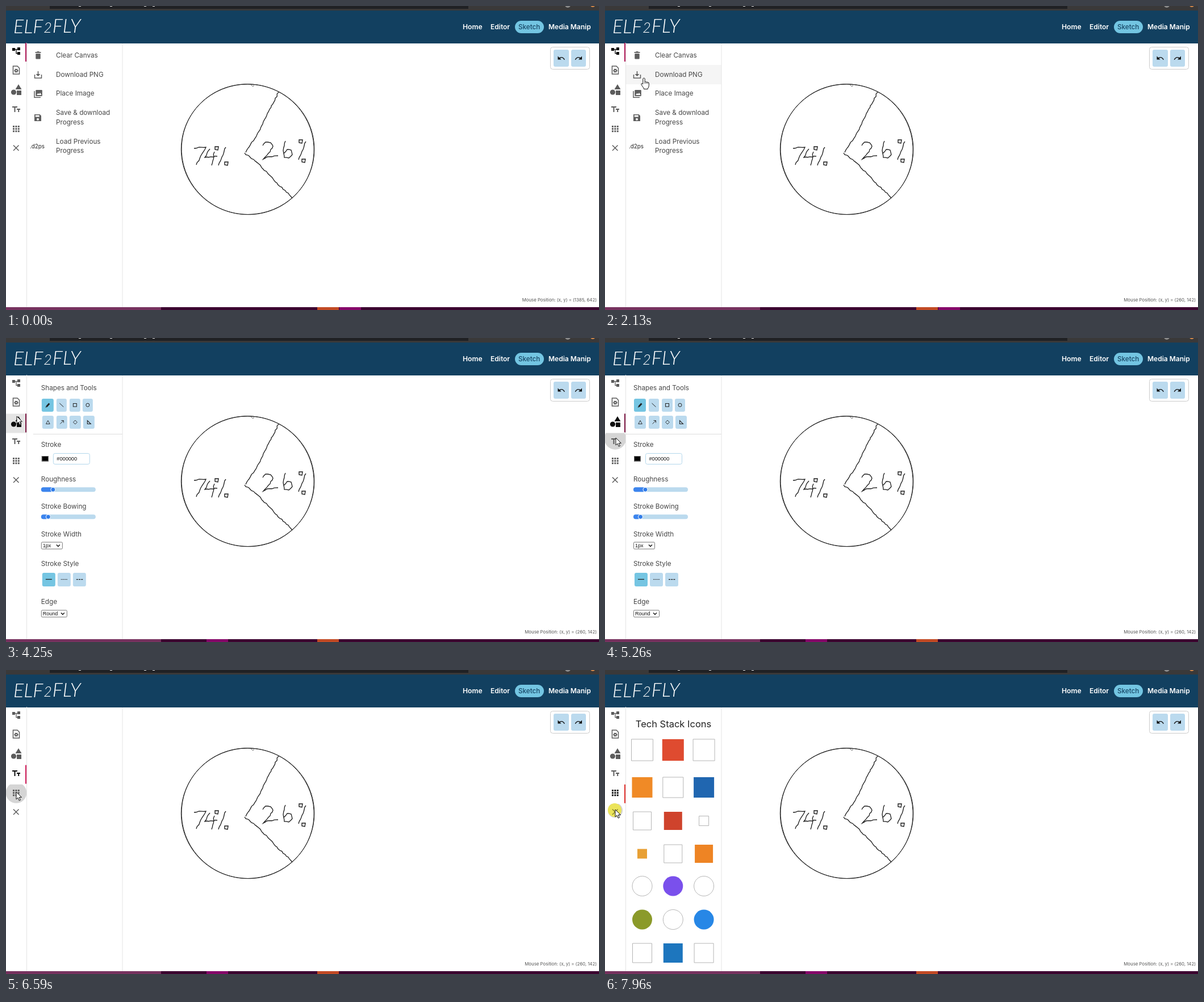
Recreate the animation shown at these times as an HTML page with a canvas. Size 1044 by 536 pixels, loop 8 s.

```html
<!DOCTYPE html>
<html lang="en">
<head>
<meta charset="utf-8">
<title>Sketch editor</title>
<style>
html, body { margin: 0; width: 100%; height: 100%; overflow: hidden; background: #fff; }
canvas { display: block; }
</style>
</head>
<body>
<canvas id="stage" width="1044" height="536"></canvas>
<script>
const ctx = document.getElementById('stage').getContext('2d');
const LOOP = 8000, RELEASE = 270, SLIDE = 460;
const UI = 'Inter, sans-serif', FORM = '"Liberation Sans", Arial, sans-serif';
const PALE = '#bbdaee', PICKED = '#75c5e2', GREY = '#5c5c5c', INK = '#1c1c1c';

// time, x, y of the pointer tip
const POINTER = [
  [70, 850, 470], [320, 562, 306], [650, 562, 306], [860, 361, 205],
  [1450, 361, 205], [1790, 54, 139], [1980, 54, 139], [2130, 69, 127],
  [2420, 17, 114], [2660, 17, 114], [3410, 20, 133], [3500, 20, 135],
  [3600, 19, 138], [4300, 19, 138], [4590, 19, 161], [4640, 19, 161],
  [4770, 19, 176], [5300, 19, 176], [5830, 18, 211], [5910, 18, 215],
  [7210, 18, 215], [7530, 18, 246], [8000, 18, 246]
];
const HAND_TIMES = [[1600, 3800], [4450, 4770], [5450, 5830], [7210, 7530]];
const CLICKS = [2660, 3800, 5040, 6380, 7810];
const MARKS = ['#b01857', '#dc1452', '#7c1743', '#cf1b58', '#e0302c'];

const clamp = v => Math.max(0, Math.min(1, v));
const easeOut = p => 1 - (1 - clamp(p)) ** 3;
const tabTop = i => 65 + 34.2 * i;

function seeded(seed) {
  return () => (seed = (seed * 16807) % 2147483647) / 2147483647;
}

function rect(x, y, w, h, color) {
  ctx.fillStyle = color;
  ctx.fillRect(x, y, w, h);
}

function box(x, y, w, h, r, fill, stroke, width = 1) {
  ctx.beginPath();
  ctx.roundRect(x, y, w, h, r);
  paint(fill, stroke, width);
}

function disc(x, y, r, fill, stroke, width = 1) {
  ctx.beginPath();
  ctx.arc(x, y, r, 0, Math.PI * 2);
  paint(fill, stroke, width);
}

function paint(fill, stroke, width) {
  if (fill) { ctx.fillStyle = fill; ctx.fill(); }
  if (stroke) { ctx.strokeStyle = stroke; ctx.lineWidth = width; ctx.stroke(); }
}

function line(points, color, width = 1, close = false) {
  ctx.beginPath();
  for (let i = 0; i < points.length; i += 2) ctx.lineTo(points[i], points[i + 1]);
  if (close) ctx.closePath();
  paint(null, color, width);
}

function shape(x, y, d, fill, stroke, width = 1) {
  ctx.save();
  ctx.translate(x, y);
  const p = new Path2D(d);
  if (fill) { ctx.fillStyle = fill; ctx.fill(p); }
  if (stroke) { ctx.strokeStyle = stroke; ctx.lineWidth = width; ctx.stroke(p); }
  ctx.restore();
}

function text(s, x, y, size = 11.7, color = '#474747', weight = 400, family = UI, align = 'left') {
  ctx.font = `${weight} ${size}px ${family}`;
  ctx.textAlign = align;
  ctx.textBaseline = 'middle';
  ctx.fillStyle = color;
  ctx.fillText(s, x, y);
}

function pointerAt(t) {
  if (t < POINTER[0][0]) return null;
  const i = POINTER.findIndex(k => k[0] > t);
  const [t0, x0, y0] = POINTER[i - 1], [t1, x1, y1] = POINTER[i];
  const p = (t - t0) / (t1 - t0);
  return { x: x0 + (x1 - x0) * p, y: y0 + (y1 - y0) * p };
}

function logo() {
  let x = 13;
  for (const [s, size, y] of [['ELF', 34, 48], ['2', 25, 47], ['FLY', 34, 47]]) {
    ctx.font = `italic 300 ${size}px Lato, sans-serif`;
    ctx.textAlign = 'left';
    ctx.textBaseline = 'alphabetic';
    ctx.fillStyle = '#fff';
    ctx.fillText(s, x, y);
    x += ctx.measureText(s).width + 1;
  }
}

function header() {
  rect(0, 0, 1044, 8, '#3a3939');
  rect(77, 0, 737, 5, '#202124');
  for (const x of [128, 183, 243, 258]) rect(x, 0, 4, 1, '#ddd');
  disc(989, -2, 5, '#8b8b8b');
  disc(1033, -2, 4, '#d98b4a');
  rect(0, 8, 1044, 58, '#124060');
  logo();
  text('Home', 804, 37, 12.2, '#fff', 600);
  text('Editor', 853, 37, 12, '#fff', 600);
  box(896, 26, 51, 22, 11, '#73c5e2');
  text('Sketch', 902, 37, 11.7, '#174766', 500);
  text('Media Manip', 955, 37, 12, '#fff', 600);
}

function history() {
  box(958.5, 72.5, 69, 39, 4, '#fff', '#ccc');
  box(964, 77, 27, 30, 3, PALE);
  box(995, 77, 26, 30, 3, PALE);
  const undo = 'M-6-4V2H0L-2.2-.2Q2.2-3 5 2.5L6.4 2Q3-5-3.4-1.4z';
  shape(977.5, 92.5, undo, '#111');
  ctx.save();
  ctx.translate(1008, 92.5);
  ctx.scale(-1, 1);
  shape(0, 0, undo, '#111');
  ctx.restore();
}

function taskbar(t) {
  rect(0, 531, 1044, 5, '#3c0330');
  rect(0, 531, 273, 5, '#77325f');
  rect(548, 531, 38, 5, '#c24a25');
  rect(t < 2750 ? 587 : 353, 531, 38, 5, '#86086a');
}

// a hand-drawn stroke: short segments pushed off the straight line
function rough(points, seed, jag = 1) {
  const rnd = seeded(seed), out = [points[0], points[1]];
  for (let i = 2; i < points.length; i += 2) {
    const [x0, y0, x1, y1] = points.slice(i - 2, i + 2);
    const n = Math.max(1, Math.round(Math.hypot(x1 - x0, y1 - y0) / 4));
    for (let k = 1; k <= n; k++) {
      const amp = k < n ? jag : 0;
      out.push(x0 + (x1 - x0) * k / n + (rnd() - .5) * 2 * amp,
               y0 + (y1 - y0) * k / n + (rnd() - .5) * 2 * amp);
    }
  }
  line(out, INK, 1.3);
}

// slash starts at x, y; a square is centred on each of the two dots
function percent(x, y, dots) {
  rough([x, y, x - 5, y + 14, x - 13, y + 32], 61, .8);
  for (const [cx, cy] of dots) {
    line([cx - 3, cy - 3, cx + 3, cy - 3, cx + 2, cy + 3, cx - 3, cy + 2], INK, 1.4, true);
  }
}

function pie() {
  for (const [rx, ry, turn] of [[117.3, 114.8, 0], [116.7, 115, .25]]) {
    ctx.beginPath();
    ctx.ellipse(425.6, 252.7, rx, ry, turn, 0, Math.PI * 2);
    paint(null, '#222', 1);
  }
  line([431, 139, 435, 142, 437, 139], '#555', .8);
  rough([480, 152, 459, 193, 440, 231, 422, 258], 17);
  rough([420, 259, 448, 281, 466, 300, 482, 318, 497, 330, 504, 339], 29);
  rough([331, 251, 340, 249, 352, 249, 343, 264, 335, 280], 7, .9);
  rough([359, 252, 350, 267, 372, 265], 11, .9);
  rough([367, 257, 362, 281], 13, .9);
  percent(387, 249, [[371, 251], [388, 278]]);
  rough([452, 246, 457, 240, 466, 241, 470, 247, 465, 257, 453, 270, 460, 266, 479, 264], 19, .7);
  rough([492, 238, 488, 255, 490, 267, 498, 268, 504, 262, 502, 254, 495, 253, 489, 260], 23, .6);
  percent(528, 239, [[519, 239], [524, 273]]);
}

function treeIcon(c) {
  rect(11, 74, 5, 5, c);
  rect(20, 73, 5, 5, c);
  rect(20, 81, 5, 5, c);
  line([16, 76.5, 20, 76.5], c, 1.3);
  line([18, 76.5, 18, 83.5, 20, 83.5], c, 1.3);
}

function setupIcon(c) {
  shape(18, 113, 'M-5.5-7H2L5.5-3.5V7H-5.5z', null, c, 1.5);
  disc(18, 114, 2, null, c, 1.8);
  for (let a = 0; a < 6; a++) {
    const u = Math.cos(a * Math.PI / 3), v = Math.sin(a * Math.PI / 3);
    line([18 + u * 2.4, 114 + v * 2.4, 18 + u * 3.8, 114 + v * 3.8], c, 1.3);
  }
}

function shapesIcon(c) {
  shape(22, 138, 'M0 0L5.5 9H-5.5z', c);
  disc(13.5, 152, 4.6, c);
  rect(19, 149, 8, 8, c);
}

function textIcon(c) {
  rect(11, 177, 9, 2, c);
  rect(14.5, 177, 2, 10, c);
  rect(19, 181, 6, 2, c);
  rect(21.2, 181, 2, 6, c);
}

function gridIcon(c) {
  for (let i = 0; i < 9; i++) rect(12 + i % 3 * 4.4, 211 + Math.floor(i / 3) * 4.2, 2.9, 2.9, c);
}

function closeIcon(c) {
  line([13, 245.5, 22.5, 255], c, 1.5);
  line([22.5, 245.5, 13, 255], c, 1.5);
}

const TABS = [treeIcon, setupIcon, shapesIcon, textIcon, gridIcon, closeIcon];

function ripple(t, start, tab) {
  const age = t - start;
  if (age < 0 || age > RELEASE + 500) return;
  const fade = 1 - clamp((age - RELEASE) / 500);
  ctx.save();
  ctx.beginPath();
  ctx.rect(0, tabTop(tab), 36, 34.2);
  ctx.clip();
  disc(18, pointerAt(start).y + 1.5, Math.min(40, age * .087), `rgba(0,0,0,${.165 * fade})`);
  ctx.restore();
}

function sidebar(t, active, since) {
  CLICKS.forEach((start, i) => ripple(t, start, i + 1));
  const closing = t >= CLICKS[4];
  if (closing) disc(17, 247, Math.min(12, (t - CLICKS[4]) * .08), '#ebe45a');
  TABS.forEach((icon, i) => icon(i === active ? '#0c0c0c' : i === 5 && closing ? '#85802c' : GREY));
  rect(36, 65, 1, 466, '#e3e3e3');
  const from = Math.max(0, active - 1);
  const y = tabTop(from + (active - from) * easeOut((t - since) / 180));
  rect(34, y, 2, 33, MARKS[active]);
}

function filePanel(tip) {
  const edges = [69, 104, 138, 171, 222, 272];
  if (tip && tip.x > 37 && tip.x < 205) {
    const row = edges.findIndex((y, i) => tip.y >= y && tip.y < edges[i + 1]);
    if (row >= 0) rect(37, edges[row], 168, edges[row + 1] - edges[row], '#f5f5f5');
  }
  const c = '#5e5e5e';
  rect(51.5, 81, 10, 1.8, c);
  rect(54.5, 80, 4, 2, c);
  box(52.3, 84, 8.4, 9.5, 1.2, c);
  line([50.5, 121, 50.5, 127, 62.5, 127, 62.5, 121], c, 1.5);
  shape(56.5, 124, 'M-.8-9H.8V-4H4L0 0L-4-4H-.8z', c);
  line([50, 150, 50, 161.3, 61, 161.3], c, 1.5);
  box(52.3, 148, 11.5, 11, 1.2, c);
  shape(54, 157, 'M0 0L2.6-3.4L4.2-1.5L6-4.2L8.6 0z', '#fff');
  shape(56, 197, 'M-6-6H3.5L6-3.5V6H-6z', c);
  rect(51.7, 192.5, 7, 3, '#fff');
  disc(56, 199.8, 2, '#fff');
  text('.d2ps', 42, 248, 9.8, '#222');
  [['Clear Canvas', 87], ['Download PNG', 121], ['Place Image', 154.5], ['Save & download', 188.5],
   ['Progress', 205.5], ['Load Previous', 239], ['Progress', 255.5]].forEach(([s, y]) => text(s, 88, y));
}

function colorField(y, color, value) {
  rect(51, y - 5, 12, 9.5, color);
  ctx.strokeStyle = '#777';
  ctx.lineWidth = 1;
  ctx.strokeRect(51.5, y - 4.5, 11, 8.5);
  box(71.5, y - 9.5, 64, 19, 3, '#fff', '#b3d7ec');
  text(value, 77.5, y + .3, 9.2, '#111', 400, FORM);
}

function setupPanel() {
  text('Canvas Setup', 50, 88);
  colorField(113.5, '#fff', '#ffffff');
}

function slider(y, thumb) {
  box(50, y - 4, 96, 8, 4, PALE);
  box(50, y - 4, thumb - 50, 8, 4, '#3d85ee');
  disc(thumb, y, 4, '#2f7be8', '#fff', 1);
}

function select(y, w, value) {
  box(50.5, y - 6, w - 1, 12, 1.5, '#fff', '#777');
  text(value, 53, y + .4, 9, '#111', 400, FORM);
  line([50 + w - 11, y - 1.4, 50 + w - 8, y + 1.6, 50 + w - 5, y - 1.4], '#111', 1.4);
}

function shapesPanel() {
  const ink = '#222';
  text('Shapes and Tools', 50, 88);
  [[51, 21], [77, 18], [100, 19], [123, 18]].forEach(([x, w], i) => box(x, 107, w, 23, 3, i ? PALE : PICKED));
  [[52, 20], [77, 19], [100, 20], [124, 20]].forEach(([x, w]) => box(x, 137, w, 23, 3, PALE));
  line([59.5, 121, 64.5, 115.5], ink, 2.8);
  line([58, 122.4, 60, 120.4], ink, 1.2);
  line([82.5, 115, 89.5, 121.5], ink);
  ctx.strokeRect(106.5, 115.5, 6, 5.5);
  disc(132, 118.2, 3, null, ink);
  line([62, 145.5, 65.3, 151.5, 58.7, 151.5], ink, .9, true);
  line([83.5, 151.5, 89, 146], ink, .9);
  line([85.5, 145.5, 89.5, 145.5, 89.5, 149.5], ink, .9);
  line([110, 145, 113.4, 148.5, 110, 152, 106.6, 148.5], ink, .9, true);
  line([131.5, 145.5, 131.5, 151.5, 137.5, 151.5], ink, 1.1, true);
  rect(36, 169, 170, 1, '#dcdcdc');
  text('Stroke', 50, 188.5);
  colorField(213, '#000', '#000000');
  text('Roughness', 50, 249);
  slider(267.3, 71);
  text('Stroke Bowing', 50, 297.5);
  slider(315.3, 62.5);
  text('Stroke Width', 50, 346);
  select(366, 38, '1px');
  text('Stroke Style', 50, 398.5);
  [52, 79, 106].forEach((x, i) => box(x, 414, 23, 24, 3, i ? PALE : PICKED));
  line([58, 425.5, 69, 425.5], ink, 1.3);
  for (let i = 0; i < 5; i++) rect(85 + i * 2.4, 425, 1.3, 1.2, ink);
  for (let i = 0; i < 3; i++) rect(112 + i * 4.2, 425, 3, 1.3, ink);
  text('Edge', 50, 465.5);
  select(486, 46, 'Round');
}

// one plain mark per cell: y, size, colours (null is an outline), round
const ICON_ROWS = [
  [141, 38, [null, '#df4b30', null]],
  [207, 36, ['#f08a26', null, '#2066b0']],
  [266, 32, [null, '#cf432c', null]],
  [324, 32, ['#e8a035', null, '#ee8424']],
  [381, 35, [null, '#7a50ec', null], true],
  [440, 35, ['#8b9a2a', null, '#2787e6'], true],
  [499, 34, [null, '#1d76be', null]]
];
const SMALL_CELLS = ['2,2', '3,0'];

function stackPanel() {
  text('Tech Stack Icons', 120.5, 96.5, 16.5, '#222', 400, UI, 'center');
  ICON_ROWS.forEach(([y, size, colors, round], r) => colors.forEach((color, c) => {
    const s = SMALL_CELLS.includes(`${r},${c}`) ? 17 : size, x = 65.5 + c * 54.3;
    const edge = color ? null : '#b5b5b5';
    box(x - s / 2, y - s / 2, s, s, round ? s / 2 : 0, color, edge);
  }));
}

const PANELS = [filePanel, setupPanel, shapesPanel, () => {}, stackPanel];

function panel(t, active, since, tip) {
  const p = active ? easeOut((t - since) / SLIDE) : 1;
  ctx.save();
  ctx.beginPath();
  ctx.rect(37, 65, 168, 466);
  ctx.clip();
  ctx.globalAlpha = clamp(p * 2);
  ctx.translate((1 - p) * 53, 0);
  PANELS[active](tip);
  ctx.restore();
  rect(204.5, 66, 1, 465, '#e6e6e6');
}

function mouseLabel(t, tip) {
  let x = 1385, y = 642;
  if (tip) {
    x = Math.round(tip.x / .5437);
    y = Math.round((tip.y - 65) / .5437);
    if (x <= 260 || t > 1790) { x = 260; y = 142; }
  }
  text(`Mouse Position: (x, y) = (${x}, ${y})`, 1040, 519, 7.8, '#555', 400, UI, 'right');
}

const ARROW = 'M0 0V13L3 10.2L5.2 15.2L7.4 14.2L5.2 9.4H9.4z';
const HAND = 'M-2 10V1.8a1.7 1.7 0 0 1 3.4 0V7q1.5-1 2.6 .3 1.4-.8 2.4 .4 2-.4 2.1 1.6v4q0 3-2 5v1.2h-7v-1.5q-2.5-3-4.3-6.5-.6-1.8 .8-1.8 1 .2 2 1z';

function pointer(t, tip) {
  if (!tip) return;
  const hand = HAND_TIMES.some(([a, b]) => t >= a && t < b);
  shape(tip.x, tip.y, hand ? HAND : ARROW, '#fff', '#111');
  if (hand) shape(tip.x, tip.y, 'M1.4 7V10M4 7.5V10M6.4 8V10', null, '#111', .8);
}

function draw() {
  const t = performance.now() % LOOP;
  const tip = pointerAt(t);
  const active = CLICKS.slice(0, 4).filter(c => t >= c + RELEASE).length;
  const since = active ? CLICKS[active - 1] + RELEASE : -1000;
  rect(0, 0, 1044, 536, '#fff');
  header();
  pie();
  history();
  panel(t, active, since, tip);
  sidebar(t, active, since);
  mouseLabel(t, tip);
  taskbar(t);
  pointer(t, tip);
  requestAnimationFrame(draw);
}
draw();
</script>
</body>
</html>
```
